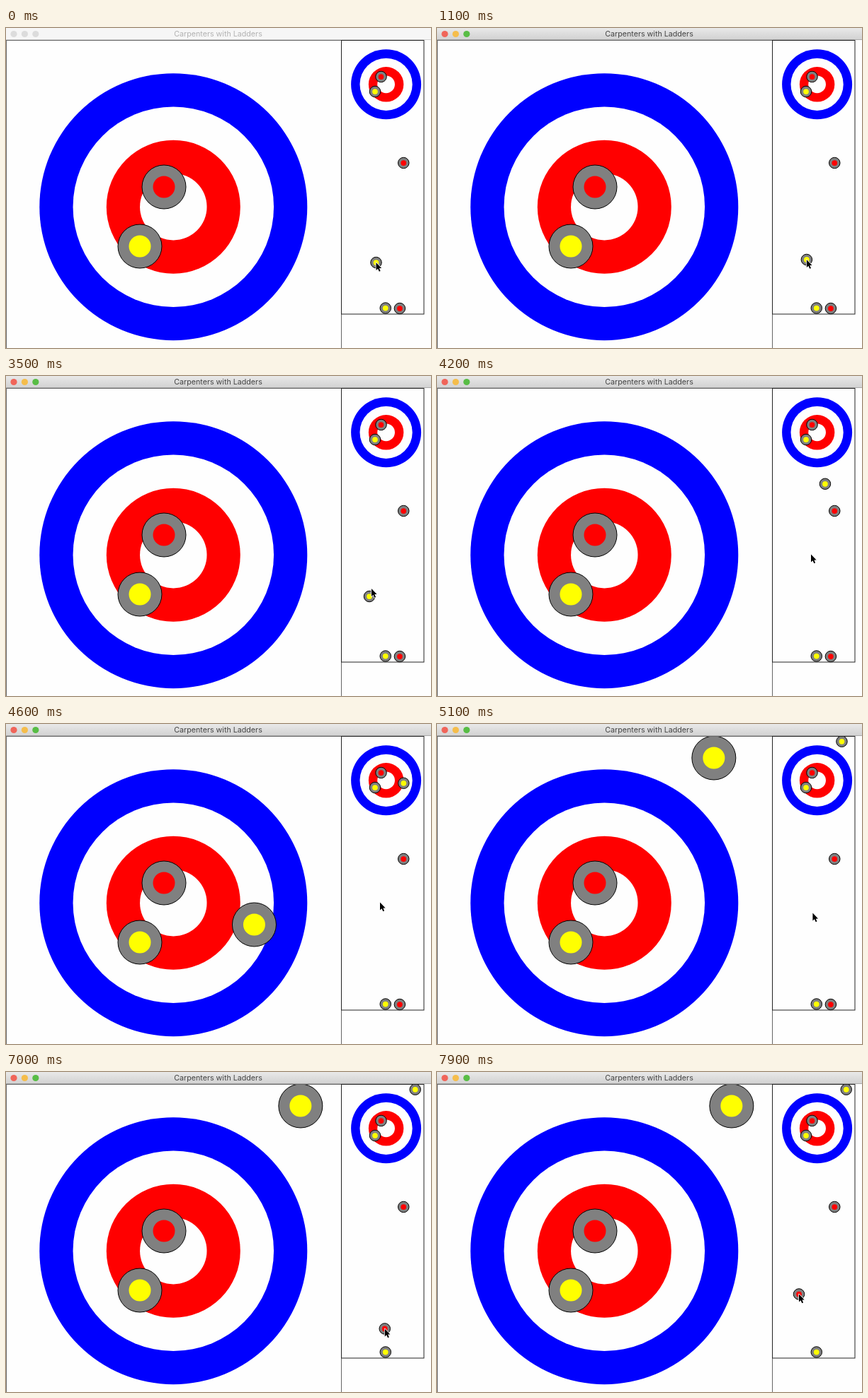
Recreate the animation shown at these times as an HTML page with a canvas. Size 600 px wide and 453 px high, loop 8000 ms.

```html
<!DOCTYPE html>
<html lang="en">
<head>
<meta charset="utf-8">
<title>Carpenters with Ladders</title>
<style>
  html, body { margin: 0; width: 100%; height: 100%; overflow: hidden; background: #fff; }
  canvas { position: absolute; left: 0; top: 0; }
  #title {
    position: absolute; left: 0; top: 0; width: 599px; height: 17px;
    font: 10.7px/17px Inter, Roboto, sans-serif; text-align: center; color: #b2b2b2;
  }
  .active #title { color: #444; }
</style>
</head>
<body>
<canvas id="stage" width="600" height="453"></canvas>
<div id="title">Carpenters with Ladders</div>
<script>
const ctx = document.getElementById('stage').getContext('2d');
const LOOP = 8000, STEP = 100;
const FOCUS = 400, RELEASE = 3400, THROW = 3500, WALL = 5100, GRAB = 6300;
const RED = '#f00', YELLOW = '#ff0', BLUE = '#00f', WHITE = '#fefefe';
const SHEET_X = 473.75, TOP = 17, SCALE = 4, RADIUS = 7.75;

const hand = { x: 522.5, y: 332 };
const moves = [
  { from: 900, to: 2100, x: 514, y: 277 },
  { from: 2400, to: RELEASE, x: 513, y: 313 },
  { from: RELEASE, to: 3750, x: 528, y: 252.5 },
  { from: 4900, to: 5900, x: 551, y: 397 },
  { from: GRAB, to: 7900, x: 511, y: 314.5 }
];

function handAt(t) {
  let { x, y } = hand;
  for (const m of moves) {
    const p = Math.min(1, Math.max(0, (t - m.from) / (m.to - m.from)));
    const ease = p * p * (3 - 2 * p);
    x += (m.x - x) * ease;
    y += (m.y - y) * ease;
  }
  return [x, y];
}

// Held by the hand, then thrown with friction until it stops along the far wall
function yellowAt(t) {
  if (t < RELEASE) return handAt(t);
  const s = Math.max(0, Math.min(t, WALL) - THROW) / 1000;
  const slide = 1 - Math.max(0, 1 - Math.max(0, t - WALL) / 700) ** 2;
  return [
    513 + 60.3 * s - 14.85 * s * s + 6.25 * slide,
    Math.max(TOP + RADIUS, 312 - 262.5 * s + 50 * s * s)
  ];
}

const redAt = t => t < GRAB ? [555.9, 397] : handAt(t);

function disc(x, y, r, fill, stroke) {
  ctx.beginPath();
  ctx.arc(x, y, r, 0, 2 * Math.PI);
  ctx.fillStyle = fill;
  ctx.fill();
  if (stroke) {
    ctx.strokeStyle = stroke;
    ctx.stroke();
  }
}

function house(x, y, r) {
  [BLUE, WHITE, RED, WHITE].forEach((c, i) => disc(x, y, r * (4 - i) / 4, c));
}

function stone(x, y, r, color) {
  disc(x, y, r, '#808080', '#000');
  disc(x, y, r / 2, color);
}

function titleBar(active) {
  const fill = ctx.createLinearGradient(0, 0, 0, 16);
  fill.addColorStop(0, active ? '#e9e9e9' : '#f6f6f6');
  fill.addColorStop(1, active ? '#d2d2d2' : '#f6f6f6');
  ctx.fillStyle = fill;
  ctx.fillRect(0, 0, 600, 16);
  ctx.fillStyle = active ? '#aaa' : '#d0d0d0';
  ctx.fillRect(0, 16, 600, 1);
  ['#f0655a', '#f5bd4b', '#58bd45'].forEach((c, i) =>
    disc(11 + 15.4 * i, 8.5, 4.6, active ? c : '#dcdcdc'));
  document.body.classList.toggle('active', active);
}

const arrow = new Path2D('M0 0V11L2.5 8.8L4.3 12.8L6.1 12L4.4 8.1L7.6 8Z');

function pointer(x, y) {
  ctx.save();
  ctx.translate(x, y);
  ctx.lineJoin = 'round';
  ctx.lineWidth = 1.5;
  ctx.strokeStyle = WHITE;
  ctx.stroke(arrow);
  ctx.fillStyle = '#000';
  ctx.fill(arrow);
  ctx.restore();
}

function draw(t) {
  const stones = [
    [529.5, 69, RED], [521, 90, YELLOW], [561.25, 191, RED], [535.75, 396.5, YELLOW],
    [...redAt(t), RED], [...yellowAt(t), YELLOW]
  ];
  ctx.lineWidth = 1;
  ctx.fillStyle = WHITE;
  ctx.fillRect(0, 0, 600, 453);

  // Close-up view
  ctx.save();
  ctx.beginPath();
  ctx.rect(0, TOP, 473, 436);
  ctx.clip();
  house(236.3, 253.2, 189);
  for (const [x, y, c] of stones) {
    stone(SCALE * (x - SHEET_X), TOP + SCALE * (y - TOP), SCALE * RADIUS, c);
  }
  ctx.restore();
  ctx.strokeStyle = '#666';
  ctx.strokeRect(0.5, TOP + 0.5, 473, 500);

  // Whole sheet
  house(536.6, 79.8, 49.5);
  for (const [x, y, c] of stones) stone(x, y, RADIUS, c);
  ctx.strokeStyle = '#222';
  ctx.strokeRect(473.5, TOP + 0.5, 116.5, 387.5);

  titleBar(t >= FOCUS);
  pointer(...handAt(t));
}

function tick() {
  const t = performance.now() % LOOP;
  draw(Math.floor(t / STEP) * STEP);
  requestAnimationFrame(tick);
}
tick();
</script>
</body>
</html>
```
